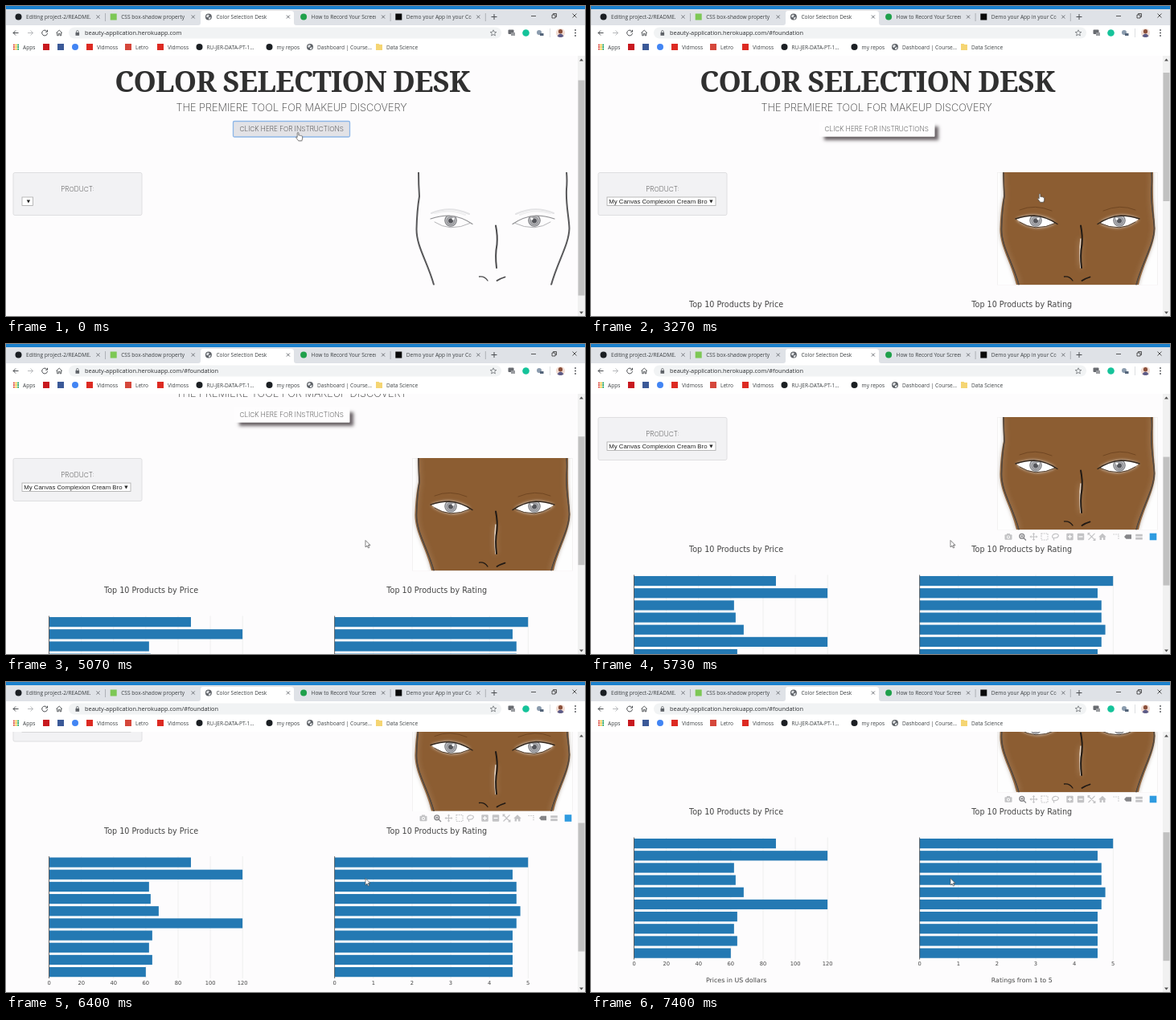
These frames come from a looping animation (720x386 px, 7.47 s). An HTML page with a canvas:

```html
<!DOCTYPE html>
<html lang="en">
<head>
<meta charset="utf-8">
<title>Color Selection Desk</title>
<style>
html, body { margin: 0; width: 100%; height: 100%; overflow: hidden; background: #fdfcfd; }
canvas { display: block; width: 720px; height: 386px; }
</style>
</head>
<body>
<canvas id="stage"></canvas>
<script>
const W = 720, H = 386, LOOP = 7470, STEP = 1000 / 15;
const canvas = document.getElementById('stage');
const c = canvas.getContext('2d');
const dpr = window.devicePixelRatio || 1;
canvas.width = W * dpr;
canvas.height = H * dpr;

const UI = '"Open Sans", "Noto Sans", sans-serif';
const THIN = 'Inter, "Open Sans", sans-serif';
const PLOT = '"DejaVu Sans", sans-serif';
const ARIAL = '"Liberation Sans", Arial, sans-serif';
const BLUE = '#2479b3';

// --- helpers ---
function text(s, x, y, font, color = '#333', align = 'left') {
  c.font = font;
  c.fillStyle = color;
  c.textAlign = align;
  c.fillText(s, x, y);
}
function rect(x, y, w, h, color) {
  c.fillStyle = color;
  c.fillRect(x, y, w, h);
}
function round(x, y, w, h, r, fill, stroke, lw = 1) {
  c.beginPath();
  c.roundRect(x, y, w, h, r);
  if (fill) { c.fillStyle = fill; c.fill(); }
  if (stroke) { c.strokeStyle = stroke; c.lineWidth = lw; c.stroke(); }
}
function disc(x, y, r, color) {
  c.beginPath();
  c.arc(x, y, r, 0, 7);
  c.fillStyle = color;
  c.fill();
}
function ring(x, y, r, color, lw) {
  c.beginPath();
  c.arc(x, y, r, 0, 7);
  c.strokeStyle = color;
  c.lineWidth = lw;
  c.stroke();
}
function lines(d, color, lw = 1) {
  c.strokeStyle = color;
  c.lineWidth = lw;
  c.stroke(new Path2D(d));
}
function shape(d, color) {
  c.fillStyle = color;
  c.fill(new Path2D(d));
}
function at(x, y, draw) {
  c.save();
  c.translate(x, y);
  draw();
  c.restore();
}
function glow(color, blur, draw, shift = 0) {
  c.save();
  c.shadowColor = color;
  c.shadowBlur = blur * dpr;
  c.shadowOffsetX = c.shadowOffsetY = shift * dpr;
  draw();
  c.restore();
}
const clamp = v => Math.max(0, Math.min(1, v));
const ease = v => v * v * (3 - 2 * v);
const part = (t, a, b) => clamp((t - a) / (b - a));

// --- browser window ---
function globe(x, y) {
  disc(x, y, 4, '#5f6368');
  shape(`M${x - 3} ${y - 1}l2 -2l2 1l-1 2l-2 1zM${x} ${y + 1}l3 -1l-1 3l-2 0z`, '#dfe1e4');
}
function folder(x, y) {
  shape(`M${x - 4} ${y - 4}h3.5l1 1h3.5v7h-8z`, '#f5d573');
}
const badge = (color, square) => (x, y) =>
  square ? rect(x - 4, y - 4, 8, 8, color) : disc(x, y, 4, color);

const tabs = [
  ['Editing project-2/README.md', badge('#1b1f23')],
  ['CSS box-shadow property', badge('#7dc855', true)],
  ['Color Selection Desk', globe],
  ['How to Record Your Screen', badge('#1fa04b')],
  ['Demo your App in your Code', badge('#0a0a0a', true)]
];
const marks = [
  [50, badge('#c8191f', true)], [68, badge('#3b5998', true)], [86, badge('#4285f4')],
  [104, badge('#dd2a22', true), 'Vidmoss'], [152, badge('#d5473b', true), 'Letro'],
  [192, badge('#dd2a22', true), 'Vidmoss'], [240.5, badge('#1b1f23'), 'RU-JER-DATA-PT-1...'],
  [327.5, badge('#1b1f23'), 'my repos'], [378, globe, 'Dashboard | Course...'],
  [464, folder, 'Data Science']
];
function drawTabs() {
  rect(0, 0, W, 24, '#dfe2e7');
  rect(0, 0, W, 4, '#1b81ce');
  shape('M239 24q3 0 3 -3v-12q0 -3 3 -3h109q4 0 4 3v12q0 3 3 3z', '#fff');
  tabs.forEach(([name, icon], i) => {
    const x = 15.5 + i * 118.2;
    icon(x, 13.5);
    c.save();
    c.beginPath();
    c.rect(x + 9, 6, 81, 16);
    c.clip();
    text(name, x + 9.5, 16, `6.6px ${UI}`, '#3c4043');
    c.restore();
    const k = x + 99;
    lines(`M${k - 2} 11.5l4 4m0 -4l-4 4`, '#5f6368', 0.9);
    if (i === 0 || i > 2) lines(`M${x + 108} 9v10`, '#9a9da2', 0.7);
  });
  lines('M603.5 13.5h7m-3.5 -3.5v7', '#4a4d51', 1);
  lines('M653 12.5h6M679 11h4v4h-4zM680.5 11v-1.5h4v4h-1.5M704.5 9.5l5 5m0 -5l-5 5', '#333', 0.8);
}
function drawToolbar(url) {
  rect(0, 24, W, 38, '#fff');
  round(78, 26.5, 538, 14, 7, '#f1f3f4');
  lines('M15.5 33.5h-6.5m3 -3l-3 3l3 3', '#4a4d51', 1);
  lines('M27 33.5h6.5m-3 -3l3 3l-3 3', '#b9bbbe', 1);
  lines('M50.7 31.3a3.4 3.4 0 1 0 .8 2.6M51.5 29.8v2.4h-2.4', '#4a4d51', 1);
  lines('M62.5 33.5l3.7 -3.4l3.7 3.4M63.7 33v3.8h1.6v-2.3h1.8v2.3h1.6V33', '#4a4d51', 0.9);
  rect(86.5, 33, 4.6, 3.8, '#5f6368');
  lines('M87.5 33v-1.2a1.3 1.3 0 0 1 2.6 0v1.2', '#5f6368', 0.8);
  text(url, 98, 36.2, `7.4px ${UI}`, '#2b2d30');
  lines('M606 29.8l1.1 2.5l2.7 .2l-2.1 1.8l.7 2.6l-2.4 -1.4l-2.4 1.4l.7 -2.6l-2.1 -1.8l2.7 -.2z', '#5f6368', 0.7);
  round(624.5, 29.5, 7, 5.5, 1, '#686b70');
  rect(628, 33, 5, 4, '#9a9ca0');
  disc(646.5, 33.5, 4.3, '#15c39a');
  disc(663, 33, 3, '#8b9cae');
  rect(664, 34, 4.5, 3, '#54657a');
  lines('M676.5 28v11', '#d5d7da', 0.8);
  disc(689.5, 33.5, 5.5, '#f1dcd3');
  disc(689.5, 31.7, 2.6, '#8a4f3a');
  shape('M685.5 37.5q4 -6 8 0q-4 3 -8 0z', '#5b5a86');
  [30, 33.5, 37].forEach(y => disc(708, y, 0.9, '#4a4d51'));
  const dots = ['#db4437', '#f4b400', '#0f9d58', '#4285f4'];
  for (let i = 0; i < 9; i++) {
    rect(9 + i % 3 * 2.6, 47.6 + Math.floor(i / 3) * 2.6, 1.8, 1.8, dots[(i + Math.floor(i / 3)) % 4]);
  }
  text('Apps', 21, 53.7, `6.6px ${UI}`, '#3c4043');
  marks.forEach(([x, icon, name]) => {
    icon(x, 51);
    if (name) text(name, x + 9, 53.7, `6.6px ${UI}`, '#3c4043');
  });
}
function drawScrollbar(y, h) {
  rect(711, 62, 9, 324, '#f1f1f1');
  rect(711.5, y, 8, h, '#c1c1c1');
  shape('M713 68.5l2.5 -3l2.5 3z', '#505050');
  shape('M713 380.5l2.5 3l2.5 -3z', '#505050');
}

// --- page header and form ---
function drawHeader(button) {
  c.letterSpacing = '-0.8px';
  text('COLOR SELECTION DESK', 356, 107, '600 36px "Noto Serif", serif', '#303030', 'center');
  c.letterSpacing = '0px';
  text('THE PREMIERE TOOL FOR MAKEUP DISCOVERY', 355, 131, `200 12.8px ${THIN}`, '#333', 'center');
  if (button === 'shadow') {
    glow('rgba(80,72,76,.85)', 4, () => rect(285, 145, 142, 17.5, '#fff'), 4.5);
    rect(283, 144, 144.5, 18.5, '#fefdfe');
  } else {
    round(282.5, 143.5, 145, 19.5, 1.5, button === 'hover' ? '#e2e2e6' : '#fff', '#8db7e8', 1.3);
  }
  text('CLICK HERE FOR INSTRUCTIONS', 355.2, 156.2, `200 8.3px ${THIN}`, '#2d2d2d', 'center');
}
function drawForm(filled) {
  round(9, 207.5, 160, 53, 2, '#f2f2f4', '#dcdcde', 0.9);
  text('PRODUCT:', 89, 231, `200 8.3px ${THIN}`, '#333', 'center');
  const w = filled ? 135 : 13.5;
  rect(20, 238, w, 10.5, '#fff');
  c.strokeStyle = '#aaa';
  c.lineWidth = 0.8;
  c.strokeRect(20, 238, w, 10.5);
  if (filled) text('My Canvas Complexion Cream Bro', 22.3, 246, `7.8px ${ARIAL}`, '#222');
  const x = 20 + w - 7.8;
  shape(`M${x} 241.5h4.4l-2.2 4z`, '#222');
}

// --- face ---
const left = 'M513 207Q513 222 514 237Q511 255 510.5 278C510.5 300 524 318 532 347';
const right = 'M697 207Q698 217 697 228C696 248 700 262 700.5 277C700 297 686 318 678 347';
const skin = 'M512 207Q513 222 513 237Q509 255 508.5 278C508.5 300 522 318 529 347H681C688 318 701 299 701.5 277C701 262 698 248 699 207Z';
const almond = 'M529 265.5Q540 261 551 261Q566 262 577 270Q564 276 553 275.5Q540 274 529 265.5Z';

function eye(made) {
  if (made) glow('#fff', 4, () => shape(almond, '#fff'));
  else {
    lines('M529 258Q552 248 576 259', '#e3e3e5', 2);
    lines('M533 258Q552 252 571 260', '#efeff0', 2);
  }
  c.save();
  c.clip(new Path2D(almond));
  disc(553, 267, 7.5, made ? '#b9babe' : '#c2c2c5');
  ring(553, 267, 7.2, '#7d7e82', 1.1);
  ring(553, 267.5, 4.6, '#8d8e92', 1.4);
  disc(553, 267.5, 3, '#55565b');
  disc(556, 265, 1.5, '#fff');
  c.restore();
  if (made) lines('M533 254Q552 246 573 255', '#6e4521', 0.9);
  lines('M528 265Q540 261 551 261Q566 262 580 271.5', made ? '#33271d' : '#8d8d90', made ? 1.4 : 1.2);
  lines('M533 269Q542 275 553 275.8Q566 276 577 270.5', made ? '#4d3a29' : '#b4b4b7', 1);
}
function drawFace(made) {
  c.save();
  c.beginPath();
  c.rect(505.5, 207, 199, 140.5);
  c.clip();
  c.lineCap = 'round';
  if (made) {
    rect(505.5, 207, 199, 141, '#fefefe');
    c.strokeStyle = '#e4e2e2';
    c.lineWidth = 0.8;
    c.strokeRect(505.5, 207, 199, 141);
    glow('rgba(120,95,75,.5)', 4, () => shape(skin, '#8c5d32'));
    c.save();
    c.clip(new Path2D(skin));
    glow('rgba(235,215,195,.7)', 7, () => {
      lines(left, '#55493f', 1.4);
      lines(right, '#55493f', 1.4);
      lines('M609 290Q607 308 609 326', '#e6d6c6', 1.6);
    });
    c.restore();
  }
  const edge = made ? '#55493f' : '#58585a';
  lines(left, edge, made ? 1.4 : 2);
  lines(right, edge, made ? 1.4 : 2);
  const ink = made ? '#211a15' : '#4c4c4e';
  lines('M609 273.5Q611.5 286 610.5 297Q608 310 610 326', ink, 2);
  lines('M588.5 337Q595 336 599 342', ink, 1.3);
  lines('M610.5 342Q614 339.5 620.5 337.5', ink, 1.8);
  eye(made);
  c.translate(1210, 0);
  c.scale(-1, 1);
  eye(made);
  c.restore();
}

// --- charts ---
const prices = [88, 120, 62, 63, 68, 120, 64, 62, 64, 60];
const ratings = [5, 4.6, 4.7, 4.7, 4.8, 4.7, 4.6, 4.6, 4.6, 4.6];

function drawChart(x, y, title, label, values, max, tick) {
  const scale = 240.5 / max, mid = x + 127;
  text(title, mid, y + 3.4, `9.6px ${PLOT}`, '#444', 'center');
  for (let v = 0; v <= max; v += tick) {
    if (v) rect(x + v * scale - 0.3, y + 31.5, 0.7, 152, '#e9e9ea');
    text(v, x + v * scale, y + 191.3, `6.7px ${PLOT}`, '#444', 'center');
  }
  values.forEach((v, i) => rect(x, y + 33 + i * 15.17, v * scale, 12.2, BLUE));
  rect(x - 0.4, y + 31.5, 0.8, 152, '#444');
  text(label, mid, y + 212.3, `7.9px ${PLOT}`, '#444', 'center');
}
function drawModebar(y, alpha) {
  c.save();
  c.globalAlpha = alpha;
  const g = '#c3c3c5', d = '#858588';
  at(519, y, () => {
    round(-4.5, -2.8, 9, 6.5, 1, g);
    rect(-2, -4, 4, 2, g);
    disc(0, 0.5, 2, '#fff');
    disc(0, 0.5, 1.1, g);
  });
  at(536.5, y, () => { ring(-0.7, -0.7, 2.9, d, 1.4); lines('M1.5 1.5l3 3M-2 -.7h2.8m-1.4 -1.4v2.8', d, 1.2); });
  at(550.5, y, () => {
    lines('M-3.5 0h7M0 -3.5v7', g, 1.1);
    shape('M-5 0l2 -1.8v3.6zM5 0l-2 -1.8v3.6zM0 -5l1.8 2h-3.6zM0 5l1.8 -2h-3.6z', g);
  });
  at(564, y, () => { c.setLineDash([1.6, 1.2]); lines('M-4 -4h8v8h-8z', g, 1.1); });
  at(577.5, y, () => lines('M-2 2C-6 0 -3 -4 1 -3.5C6 -3 4 2 -1 1.5Q-3 2 -1.5 4.5', g, 1.2));
  at(595.5, y, () => { round(-4.2, -4.2, 8.4, 8.4, 1, g); lines('M-2.5 0h5M0 -2.5v5', '#fff', 1.3); });
  at(609, y, () => { round(-4.2, -4.2, 8.4, 8.4, 1, g); lines('M-2.5 0h5', '#fff', 1.3); });
  at(622.5, y, () => lines('M-4 -4l8 8M4 -4l-8 8M-4.4 -2v-2.4h2.4M4.4 2v2.4h-2.4', g, 1.1));
  at(636, y, () => shape('M-4.8 .3L0 -4.2L4.8 .3H3.4V4H1V1.2H-1V4H-3.4V.3z', g));
  at(653.5, y, () => { c.setLineDash([1.5, 1.2]); lines('M-4 -3h6.5v7', g, 1.1); });
  at(668, y, () => shape('M-5 0l2.5 -2.8h6.5v5.6h-6.5z', d));
  at(681.5, y, () => { rect(-4.3, -3.2, 8.6, 2.8, g); rect(-4.3, 0.8, 8.6, 2.8, g); });
  rect(694.7, y - 4.3, 8.6, 8.6, '#2f9be0');
  c.restore();
}

// --- pointer ---
const arrow = 'M0 0V8.4L2 6.6L3.4 9.4L4.6 8.9L3.4 6H5.9Z';
const hand = 'M.2 1Q1 -.6 1.9 1V4.2Q3 3.2 3.6 4.5Q4.6 3.7 5.2 4.9Q6.4 4.3 6.6 5.6V8.2L5.7 10.8H1.7L-1.4 6.8Q-1.6 5.4 .2 6.5Z';

// Quadratic sweep between rests; the via point bends the path.
const moves = [
  { a: 800, b: 1600, from: [362, 157], via: [375, 222], to: [421.5, 239] },
  { a: 1600, b: 2070, from: [421.5, 239], via: [490, 238], to: [557, 233.5] },
  { a: 3733, b: 4000, from: [557, 233.5], via: [500, 286], to: [447, 244.5] }
];
function pointer(t) {
  let p = moves[0].from;
  for (const m of moves) {
    if (t < m.a) break;
    const k = ease(part(t, m.a, m.b)), n = 1 - k;
    p = [0, 1].map(i => n * n * m.from[i] + 2 * n * k * m.via[i] + k * k * m.to[i]);
  }
  return p;
}
function drawPointer(x, y, link) {
  at(x, y, () => {
    const d = link ? hand : arrow;
    glow('rgba(0,0,0,.2)', 1.5, () => shape(d, '#fff'), 0.6);
    c.lineJoin = 'round';
    lines(d, '#555', 0.7);
  });
}

// --- timeline ---
const wheel = [[4667, 0], [5067, 65], [5733, 116], [6400, 186.5], [6900, 210]];
function scrollAt(t) {
  for (let i = 1; i < wheel.length; i++) {
    const [a, from] = wheel[i - 1], [b, to] = wheel[i];
    if (t < b) return from + (to - from) * part(t, a, b);
  }
  return wheel[wheel.length - 1][1];
}
function draw(ms) {
  const t = Math.floor((ms + 4) / STEP) * STEP;
  const picked = t > 2590, made = t > 2590, loaded = t > 2930;
  const scroll = scrollAt(t);
  const [x, y] = pointer(t);
  const overButton = x > 282 && x < 428 && y > 143 && y < 163;
  const overFace = x > 506 && x < 704 && y > 207 && y < 347 && scroll === 0;

  c.setTransform(dpr, 0, 0, dpr, 0, 0);
  rect(0, 0, W, H, '#fdfcfd');
  at(0, -scroll, () => {
    drawHeader(picked ? 'shadow' : overButton ? 'hover' : 'focus');
    drawForm(loaded);
    drawFace(made);
    if (!loaded) return;
    drawChart(53.6, 372, 'Top 10 Products by Price', 'Prices in US dollars', prices, 120, 20);
    drawChart(408.7, 372, 'Top 10 Products by Rating', 'Ratings from 1 to 5', ratings, 5, 1);
    drawModebar(356, part(scroll, 97, 112));
  });
  if (loaded) drawScrollbar(83 + scroll * 0.496, 160);
  else drawScrollbar(92.5, 268);
  drawTabs();
  drawToolbar('beauty-application.herokuapp.com' + (made ? '/#foundation' : ''));
  drawPointer(x, y, overButton || overFace);
}

const start = performance.now();
function frame(now) {
  draw(Math.max(0, now - start) % LOOP);
  requestAnimationFrame(frame);
}
draw(0);
requestAnimationFrame(frame);
</script>
</body>
</html>
```
